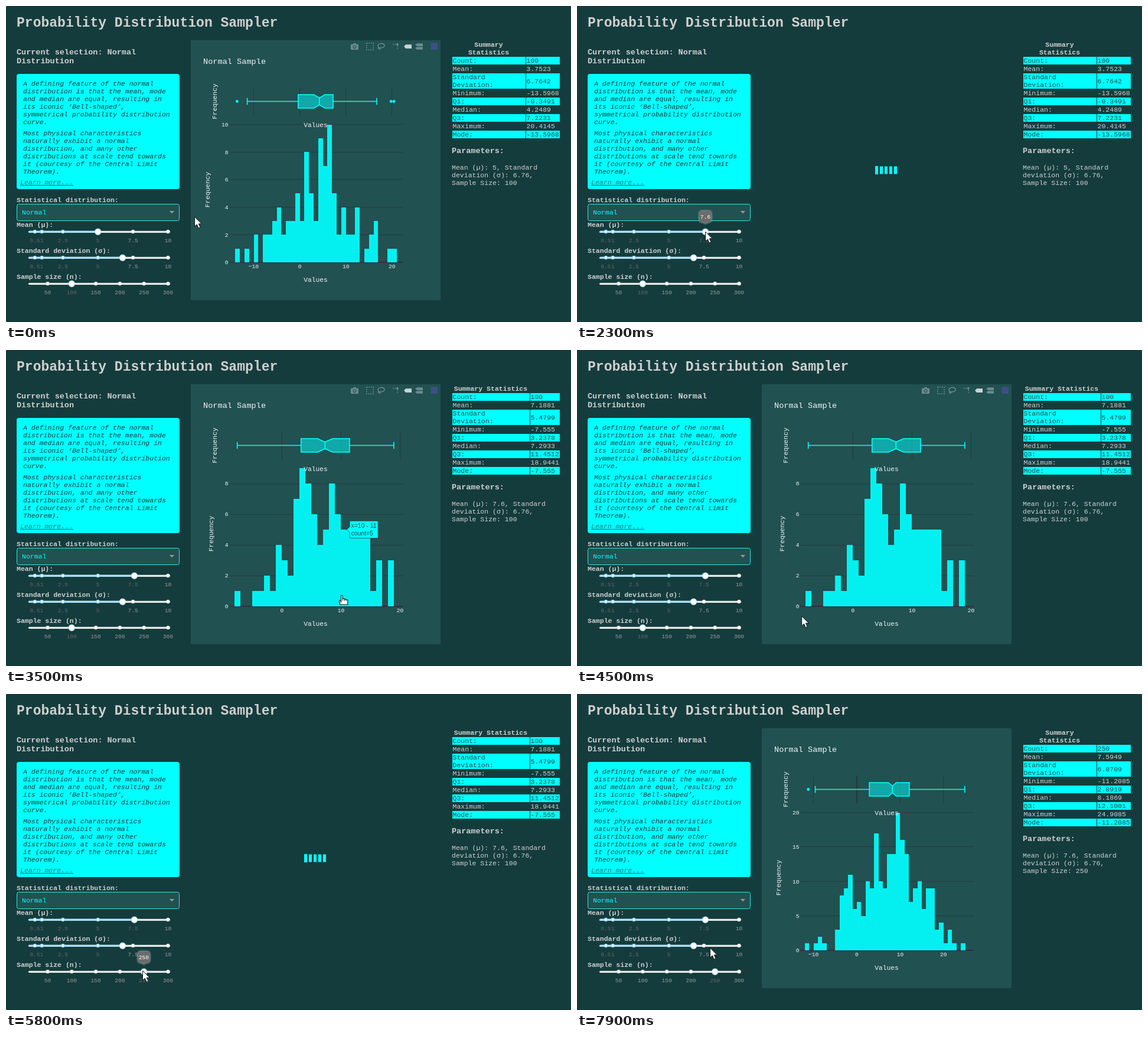
Animation of 957x535 px, one loop 8000 ms. Source, as an HTML page:

```html
<!DOCTYPE html>
<html lang="en">
<head>
<meta charset="utf-8">
<title>Probability Distribution Sampler</title>
<style>
  html, body { margin: 0; width: 100%; height: 100%; overflow: hidden; background: #153c3d; }
  svg { display: block; width: 957px; height: 535px; }
  text { font: 11.52px "Liberation Mono", "Courier New", monospace; fill: #d0d0d0; }
  .b { font-weight: bold; }
  .h1 { font-size: 23.04px; font-weight: bold; }
  .h3 { font-size: 13.48px; font-weight: bold; }
  .mid { text-anchor: middle; }
  .end { text-anchor: end; }
  .note { font-style: italic; fill: #153c3d; }
  .link { font-style: italic; fill: #178080; text-decoration: underline; }
  .dark { fill: #215150; }
  .cyan { fill: #0ff; }
  .mark { font-size: 9.6px; fill: #999; text-anchor: middle; }
  .on { fill: #666; }
  .tip { font-size: 9.6px; fill: #fff; text-anchor: middle; }
  .tick { font-size: 9.6px; fill: #f2f5fa; }
  .axis { font-size: 11.2px; fill: #f2f5fa; text-anchor: middle; }
  .ptitle { font-size: 13.6px; fill: #f2f5fa; }
  .hover { font: 10.4px "Liberation Sans", Arial, sans-serif; fill: #2b4444; }
  .grid { stroke: #283442; shape-rendering: crispEdges; }
  .bar { fill: #04f0f0; shape-rendering: crispEdges; }
  .box { fill: #0ff; fill-opacity: .5; stroke: #0ff; stroke-width: 1.6; }
  .whisk { fill: none; stroke: #0ff; stroke-width: 1.6; }
  .glow { filter: drop-shadow(0 0 1.6px #d9d9d9); }
</style>
</head>
<body>
<svg id="stage" viewBox="0 0 957 535"></svg>
<script>
const LOOP = 8000, STEP = 100;
const BASE = 434;

const samples = [
  { zero: 497.6, unit: 7.81, rise: 23.35, xTicks: [-10, 0, 10, 20], yTicks: [0, 2, 4, 6, 8, 10],
    first: -14, zeroLine: 1.6, labelX: 345, split: 880, top: 86, mean: '5', n: 100,
    counts: [1,0,1,0,2,0,2,2,3,4,2,3,3,5,3,8,5,3,9,7,10,5,2,4,2,2,4,0,1,2,3,0,0,1,1],
    low: -11.4, high: 16.7, outliers: [-13.5968, 19.8, 20.4145],
    stats: ['100', '3.7523', '6.7642', '-13.5968', '-0.3491', '4.2489', '7.2231', '20.4145', '-13.5968'] },
  { zero: 467.3, unit: 10.01, rise: 26, xTicks: [0, 10, 20], yTicks: [0, 2, 4, 6, 8],
    first: -8, zeroLine: 1, labelX: 351, split: 887, top: 73, mean: '7.6', n: 100,
    counts: [1,0,0,1,1,2,1,4,3,2,7,9,8,6,4,5,8,6,5,5,5,5,5,1,3,0,3],
    low: -7.555, high: 18.9441, outliers: [],
    stats: ['100', '7.1881', '5.4799', '-7.555', '3.2378', '7.2933', '11.4512', '18.9441', '-7.555'] },
  { zero: 474, unit: 7.34, rise: 11.675, xTicks: [-10, 0, 10, 20], yTicks: [0, 5, 10, 15, 20],
    first: -12, zeroLine: 1.6, labelX: 345, split: 880, top: 86, mean: '7.6', n: 250,
    counts: [1,0,1,2,1,0,0,3,8,9,11,6,7,5,10,9,17,10,9,14,14,20,16,14,7,9,10,6,9,9,3,4,1,3,1,0,1],
    low: -9.6, high: 24.9085, outliers: [-11.2085],
    stats: ['250', '7.5949', '6.8709', '-11.2085', '2.8919', '8.1869', '12.1001', '24.9085', '-11.2085'] }
];

// [time, x, y] of the pointer tip
const pointer = [
  [200, 319.5, 357], [900, 231, 381.5], [1000, 231, 381.5], [1300, 220.5, 382],
  [1800, 220.5, 382], [2000, 217.5, 382], [3000, 217.5, 382], [3500, 569, 415.5],
  [4000, 569, 415.5], [4900, 246, 476], [5000, 244.5, 476.5], [5100, 244.5, 476.5],
  [5400, 231.5, 468.5], [7600, 231.5, 468.5], [7900, 225.5, 430]
];
const toolbarFade = [[200, 1], [500, 0], [3150, 0], [3450, 1], [4600, 1], [4900, 0]];

const smooth = u => u * u * (3 - 2 * u);
function at(keys, t, ease = u => u) {
  const i = keys.findIndex(k => k[0] > t);
  if (i === 0) return keys[0].slice(1);
  if (i < 0) return keys[keys.length - 1].slice(1);
  const a = keys[i - 1], b = keys[i], u = ease((t - a[0]) / (b[0] - a[0]));
  return a.slice(1).map((v, j) => v + (b[j + 1] - v) * u);
}

const text = (x, y, s, cls = '', extra = '') => `<text x="${x}" y="${y}" class="${cls}" ${extra}>${s}</text>`;
const rect = (x, y, w, h, extra = '') => `<rect x="${x}" y="${y}" width="${w}" height="${h}" ${extra}/>`;
const path = (d, extra = '') => `<path d="${d}" ${extra}/>`;
const dot = (x, y, r, extra = '') => `<circle cx="${x}" cy="${y}" r="${r}" ${extra}/>`;
const lines = (x, y, gap, list, cls) => list.map((s, i) => text(x, y + i * gap, s, cls)).join('');
const minus = v => String(v).replace('-', '\u2212');

const fixed =
  text(18, 35, 'Probability Distribution Sampler', 'h1') +
  lines(18, 82, 15, ['Current selection: Normal', 'Distribution'], 'h3') +
  rect(18, 115, 276, 195, 'rx="4" fill="#0ff"') +
  lines(29, 135, 13, ['A defining feature of the normal', 'distribution is that the mean, mode',
    'and median are equal, resulting in', 'its iconic ‘Bell-shaped’,',
    'symmetrical probability distribution', 'curve.'], 'note') +
  lines(29, 219, 13, ['Most physical characteristics', 'naturally exhibit a normal',
    'distribution, and many other', 'distributions at scale tend towards',
    'it (courtesy of the Central Limit', 'Theorem).'], 'note') +
  text(24, 302, 'Learn more...', 'link') +
  text(18, 332, 'Statistical distribution:', 'b') +
  rect(18.5, 335.5, 275, 28, 'rx="3" fill="#215150" stroke="#2ee6e6"') +
  text(27, 353, 'Normal', 'cyan') +
  path('M276.8 347h8.4l-4.2 4.2z', 'fill="#999"') +
  text(18, 374, 'Mean (µ):', 'b') +
  text(18, 418, 'Standard deviation (σ):', 'b') +
  text(18, 462, 'Sample size (n):', 'b');

function slider(y, marks, toX, value, ranged) {
  const hx = toX(value), active = v => ranged ? v <= value : v === value;
  return rect(38, y - 1.6, 240, 3.2, 'rx="1.6" fill="#e9e9e9"') +
    (ranged ? rect(38, y - 1.6, hx - 38, 3.2, 'rx="1.6" fill="#abe2fb"') : '') +
    marks.map(v => dot(toX(v), y - .3, 2.5, `fill="#fff" stroke="${active(v) ? '#96dbfa' : '#e9e9e9'}" stroke-width="1.4"`) +
      text(toX(v), y + 17.5, v, active(v) ? 'mark on' : 'mark')).join('') +
    dot(hx, y, 5, 'fill="#fff" stroke="#c4e9fa" stroke-width="1.4"');
}
const unitX = v => 37 + 23.74 * v;
const sizeX = n => 29.7 + .816 * n;

function tooltip(x, y, label) {
  return `<g class="glow">` + rect(x - 10.3, y - 9.7, 20.6, 19.4, 'rx="4.4" fill="#6c6c6c"') +
    path(`M${x - 3.2} ${y + 9.6}h6.4l-3.2 3.2z`, 'fill="#6c6c6c"') + '</g>' + text(x, y + 3.2, label, 'tip');
}

function table(s) {
  const labels = ['Count:', 'Mean:', 'Standard', 'Minimum:', 'Q1:', 'Median:', 'Q3:', 'Maximum:', 'Mode:'];
  const midX = (755 + s.split) / 2, wide = s.split > 880;
  let out = wide ? text(821, 69, 'Summary Statistics', 'b mid')
    : text(midX, 69, 'Summary', 'b mid') + text(midX, 82, 'Statistics', 'b mid');
  let y = s.top;
  labels.forEach((label, i) => {
    const tall = i === 2, h = tall ? 26 : 13, cls = i % 2 ? '' : 'dark';
    if (cls) out += rect(756, y, s.split - 756, h, 'fill="#0ff"') +
      rect(s.split + 1, y, 937 - s.split, h, 'fill="#0ff"');
    out += text(756.5, y + 10, label, cls) + (tall ? text(756.5, y + 23, 'Deviation:', cls) : '') +
      text(s.split + 1.5, y + (tall ? 16.5 : 10), s.stats[i], cls);
    y += h + 1;
  });
  return out + text(755, s.top + 163, 'Parameters:', 'h3') +
    lines(755, s.top + 191, 13, [`Mean (µ): ${s.mean}, Standard`, 'deviation (σ): 6.76,', `Sample Size: ${s.n}`]);
}

function boxPlot(s) {
  const X = v => s.zero + s.unit * v, y = 161.5;
  const [q1, med, q3] = [4, 5, 6].map(i => +s.stats[i]);
  const notch = 1.57 * (q3 - q1) / Math.sqrt(s.n);
  const [a, m, b, l, r] = [q1, med, q3, med - notch, med + notch].map(X);
  const lo = X(s.low), hi = X(s.high);
  return path(`M${a} ${y - 11.5}H${l}L${m} ${y - 5.75}L${r} ${y - 11.5}H${b}V${y + 11.5}H${r}L${m} ${y + 5.75}L${l} ${y + 11.5}H${a}Z`, 'class="box"') +
    path(`M${m} ${y - 5.75}v11.5M${a} ${y}H${lo}M${b} ${y}H${hi}M${lo} ${y - 5.75}v11.5M${hi} ${y - 5.75}v11.5`, 'class="whisk"') +
    s.outliers.map(v => dot(X(v), y, 2.4, 'fill="#0ff"')).join('');
}

function plot(s) {
  const X = v => s.zero + s.unit * v, Y = c => BASE - s.rise * c;
  const grid = (d, w) => path(d, `class="grid" stroke-width="${w}"`);
  const turned = (x, y) => text(0, 0, 'Frequency', 'axis', `transform="translate(${x} ${y}) rotate(-90)"`);
  return rect(313, 58, 423, 440, 'fill="#215150"') +
    text(334, 98, 'Normal Sample', 'ptitle') +
    s.xTicks.map(v => grid(`M${X(v)} 138V184.5`, v ? .8 : s.zeroLine) +
      text(X(v), 444.4, minus(v), 'tick mid')).join('') +
    s.yTicks.map(c => grid(`M378 ${Y(c)}H672`, c ? .8 : 1.6) +
      text(376.5, Y(c) + 3.4, c, 'tick end')).join('') +
    s.counts.map((c, i) => c ? rect(X(s.first + i), Y(c), s.unit, BASE - Y(c), 'class="bar"') : '').join('') +
    boxPlot(s) +
    turned(357, 161.5) + turned(s.labelX, 311) +
    text(524.5, 205, 'Values', 'axis') + text(524.5, 467, 'Values', 'axis');
}

function toolbar(alpha) {
  if (alpha <= 0) return '';
  const dash = 'fill="none" stroke="#f2f5fa" stroke-width="1.5" stroke-dasharray="1.8 1.9"';
  const tag = (x, y, h) => `M${x} ${y + h / 2}l3.2 ${-h / 2}h9.8v${h}h-9.8z`;
  return `<g opacity="${alpha}"><g fill="#f2f5fa" opacity=".36">` +
    path('M585 65h2.6l1.2-2h3.4l1.2 2h2.6q1 0 1 1v7q0 1-1 1h-11q-1 0-1-1v-7q0-1 1-1zM590.5 66.2a3 3 0 1 0 .01 0z', 'fill-rule="evenodd"') +
    dot(590.5, 69.2, 1.7) +
    rect(610.8, 62.8, 11.4, 11.4, dash) +
    path('M631 70c-3-4 2-7 6-6.5s5.500 4 2.500 6-7 2-8.500.5zM631 70c-1 1.500 0 3 1.500 3s2-2 .5-2.800', 'fill="none" stroke="#f2f5fa" stroke-width="1.4"') +
    path('M655 65h7M663 67v7', dash) + dot(663, 65, 1.9) +
    path(tag(693, 63.5, 4.4) + tag(693, 69.3, 4.4)) + '</g>' +
    path(tag(674, 65.2, 6.8), 'fill="#f2f5fa" opacity=".8"') +
    rect(719.5, 62.5, 11.5, 11.5, 'fill="#3f4f85"') + '</g>';
}

const loader = [0, 1, 2, 3, 4].map(i => {
  const grow = i ? 0 : .6;
  return rect(505 + 8 * i, 271.5 - grow, 5, 13 + 2 * grow, 'fill="#0ff"');
}).join('');

function barUnder(s, x, y) {
  const i = Math.floor((x - s.zero) / s.unit) - s.first, c = s.counts[i];
  return c && y < BASE && y > BASE - s.rise * c ? { from: s.first + i, count: c } : null;
}

function hoverLabel(s, bar) {
  const x = s.zero + s.unit * (bar.from + 1), y = BASE - s.rise * bar.count;
  const range = `x=${minus(bar.from)} - ${minus(bar.from + 1)}`;
  const w = 4.8 + 4.8 * range.length;
  return path(`M${x} ${y}l4.800-4.800v-9.700h${w}v29h${-w}v-9.700z`, 'fill="#0ff" stroke="#215150" stroke-width=".8"') +
    text(x + 7.2, y - 3, range, 'hover') + text(x + 7.2, y + 10, `count=${bar.count}`, 'hover');
}

const arrow = path('M0 0V16.200L3.800 12.800L6.600 19L9.500 17.700L6.800 11.800H11.800Z', 'fill="#fff" stroke="#111" stroke-width="1"');
const hand = path('M-1.500 11V1.200q0-1.400 1.300-1.400t1.300 1.400V5.500q2.600-.8 2.900.9 2.300-.8 2.800.8 3-.6 3 1.800V15.500H-3.500V12.500L-5 9.500q.4-1.800 2-.8z', 'fill="#fff" stroke="#111" stroke-width="1.1"') +
  path('M1.200 5.500v3.500M4.200 6.500v3M7 7.200v2.500', 'stroke="#111" stroke-width=".9"');

const stage = document.getElementById('stage');
const plots = samples.map(plot), tables = samples.map(table);

function draw(t) {
  const mean = t < 2200 ? 5 : 7.6, n = t < 5700 ? 100 : 250;
  const shown = t < 2400 ? 0 : t < 5900 ? 1 : 2;
  const loading = t === 2300 || t === 5800;
  const [x, y] = at(pointer, t, smooth);
  const bar = loading ? null : barUnder(samples[shown], x, y);
  const scale = [.5, 1, 2.5, 5, 7.5, 10];
  stage.innerHTML = fixed +
    slider(382.3, scale, unitX, mean, true) +
    slider(426.3, scale, unitX, 6.76, true) +
    slider(470.3, [50, 100, 150, 200, 250, 300], sizeX, n, false) +
    (loading ? loader : plots[shown] + toolbar(at(toolbarFade, t)[0])) +
    tables[shown] +
    (bar ? hoverLabel(samples[shown], bar) : '') +
    (t >= 2200 && t < 3100 ? tooltip(unitX(mean), 356.5, '7.6') : '') +
    (t >= 5700 && t < 7700 ? tooltip(sizeX(n) - .3, 445.3, '250') : '') +
    `<g transform="translate(${x} ${y})">${bar ? hand : arrow}</g>`;
}

const start = performance.now();
let last = -1;
function tick() {
  const t = Math.floor((performance.now() - start) % LOOP / STEP) * STEP;
  if (t !== last) draw(last = t);
  requestAnimationFrame(tick);
}
tick();
</script>
</body>
</html>
```
